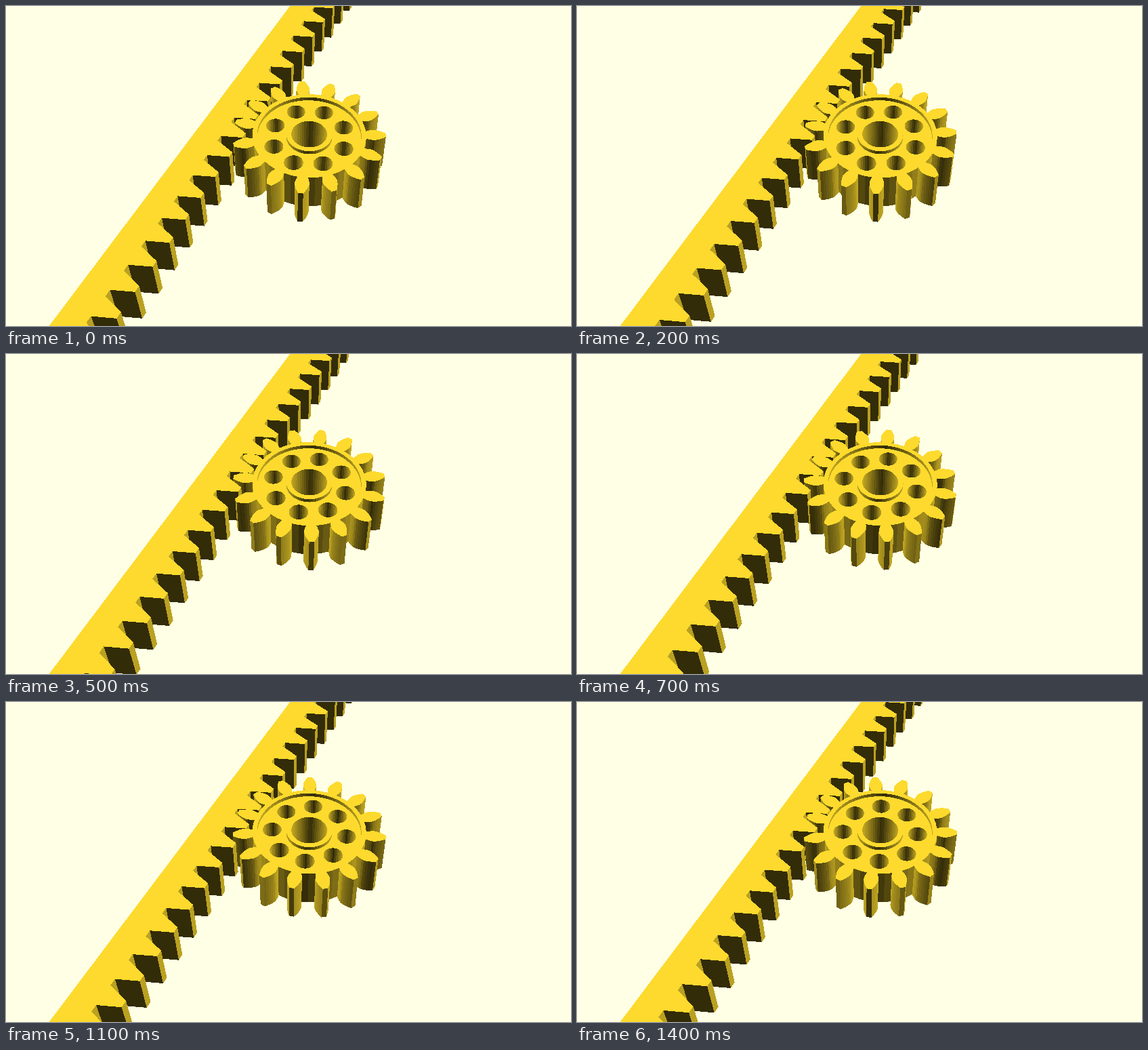
Animation of 834x472 px, one loop 1500 ms. Source, as an HTML page with a canvas:

```html
<!DOCTYPE html>
<html lang="en">
<head>
<meta charset="utf-8">
<title>Rack and pinion</title>
<style>
  html, body { margin: 0; width: 100%; height: 100%; overflow: hidden; background: #ffffe5; }
  canvas { display: block; }
</style>
</head>
<body>
<canvas id="stage" width="834" height="472"></canvas>
<script>
const W = 834, H = 472, STEPS = 15, STEP_MS = 100;
const ctx = document.getElementById('stage').getContext('2d');
const image = ctx.createImageData(W, H);
const pixels = new Uint32Array(image.data.buffer);
const nearness = new Float32Array(W * H);

const rad = deg => deg * Math.PI / 180;
const range = (n, fn) => Array.from({ length: n }, (_, i) => fn(i));

// Camera: 22.5 degree field of view, looking down at the scene
const FOCAL = H / 2 / Math.tan(rad(11.25));
const SIN = Math.sin(rad(49.3)), COS = Math.cos(rad(49.3));
const GOLD = [249, 215, 44];
const BACKGROUND = 0xffe5ffff;

// Gear and rack dimensions
const MODULE = 13.75, TEETH = 15, THICK = 67.5, RECESS = 6.6, BACKLASH = 0.7;
const PITCH = Math.PI * MODULE, PITCH_R = MODULE * TEETH / 2;
const ROOT_R = 87, TIP_R = PITCH_R + MODULE;
const BASE_R = PITCH_R * Math.cos(rad(20));
const GEAR = [31.7, 64.4];
const GEAR_PHASE = rad(-1.1), HOLE_PHASE = rad(20.1);
const RACK_SIN = Math.sin(rad(25.4)), RACK_COS = Math.cos(rad(25.4));
const RACK_START = 69.9, RACK_BACK = -158.6, RACK_ROOT = -118.9, RACK_TIP = -87.7;

const toCamera = ([x, y, z]) => [x, y * SIN + z * COS, FOCAL + y * COS - z * SIN];
const sub = (a, b) => a.map((v, i) => v - b[i]);
const dot = (a, b) => a[0] * b[0] + a[1] * b[1] + a[2] * b[2];
const cross = (a, b) => [
  a[1] * b[2] - a[2] * b[1],
  a[2] * b[0] - a[0] * b[2],
  a[0] * b[1] - a[1] * b[0]
];

function shade(normal) {
  const light = Math.abs(dot(normal, [-1, 1, -1])) / Math.sqrt(3) / Math.hypot(...normal);
  const [r, g, b] = GOLD.map(c => Math.min(255, Math.round(c * (0.2 + light))));
  return (255 << 24 | b << 16 | g << 8 | r) >>> 0;
}

// Fills a flat face (even-odd loops) with a depth test
function face(...loops) {
  const cam = loops.map(loop => loop.map(toCamera));
  const first = cam[0], n = first.length;
  const a = first[0], b = first[Math.floor(n / 3)], c = first[Math.floor(2 * n / 3)];
  const normal = cross(sub(b, a), sub(c, a));
  const offset = dot(normal, a);
  const color = shade(normal);

  const edges = [];
  let top = H, bottom = 0;
  for (const loop of cam) {
    const pts = loop.map(([x, y, z]) => [W / 2 + FOCAL * x / z, H / 2 - FOCAL * y / z]);
    pts.forEach((p, i) => {
      edges.push([p, pts[(i + 1) % pts.length]]);
      top = Math.min(top, p[1]);
      bottom = Math.max(bottom, p[1]);
    });
  }

  const lastRow = Math.min(H - 1, Math.ceil(bottom));
  for (let row = Math.max(0, Math.floor(top)); row <= lastRow; row++) {
    const y = row + 0.5, hits = [];
    for (const [p, q] of edges) {
      if ((p[1] <= y) !== (q[1] <= y)) {
        hits.push(p[0] + (q[0] - p[0]) * (y - p[1]) / (q[1] - p[1]));
      }
    }
    hits.sort((l, r) => l - r);
    const v = (H / 2 - y) / FOCAL;
    for (let i = 0; i + 1 < hits.length; i += 2) {
      const end = Math.min(W, Math.ceil(hits[i + 1] - 0.5));
      for (let col = Math.max(0, Math.ceil(hits[i] - 0.5)); col < end; col++) {
        const u = (col + 0.5 - W / 2) / FOCAL;
        const near = (normal[0] * u + normal[1] * v + normal[2]) / offset;
        const at = row * W + col;
        if (near > nearness[at]) {
          nearness[at] = near;
          pixels[at] = color;
        }
      }
    }
  }
}

const atHeight = (loop, z) => loop.map(([x, y]) => [x, y, z]);

function wall(loop, zTop, zBottom) {
  loop.forEach((p, i) => {
    const q = loop[(i + 1) % loop.length];
    face([[...p, zTop], [...q, zTop], [...q, zBottom], [...p, zBottom]]);
  });
}

const polar = (r, angle, [x, y] = GEAR) => [x + r * Math.cos(angle), y + r * Math.sin(angle)];
const circle = (r, count, turn = 0, center = GEAR) =>
  range(count, i => polar(r, turn + 2 * Math.PI * i / count, center));

const involute = cosine => Math.tan(Math.acos(cosine)) - Math.acos(cosine);

// Half the tooth thickness: involute outside, narrowing toward the root
function halfTooth(r) {
  const waist = 99, at = Math.max(r, waist);
  const angle = Math.PI / (2 * TEETH) + involute(Math.cos(rad(20))) - involute(BASE_R / at);
  const narrowing = 3.2 * (Math.max(0, waist - r) / (waist - ROOT_R)) ** 1.5;
  return at * angle - BACKLASH - narrowing;
}

function gearOutline(turn) {
  const radii = range(10, i => ROOT_R + (TIP_R - ROOT_R) * i / 9);
  return range(TEETH, k => {
    const mid = turn + 2 * Math.PI * k / TEETH;
    const side = sign => radii.map(r => polar(r, mid + sign * halfTooth(r) / r));
    return [...side(-1), ...side(1).reverse(), polar(ROOT_R, mid + Math.PI / TEETH)];
  }).flat();
}

function drawGear(turn) {
  const outline = gearOutline(GEAR_PHASE + turn);
  const rim = circle(79.7, 72, turn);
  const hub = circle(35.2, 48, turn);
  const bore = circle(27.4, 48, turn);
  const holes = range(8, i =>
    circle(14.5, 30, turn, polar(57.4, HOLE_PHASE + turn + i * Math.PI / 4)));

  face(atHeight(outline, 0), atHeight(rim, 0));
  face(atHeight(hub, 0), atHeight(bore, 0));
  face(...[rim, hub, ...holes].map(loop => atHeight(loop, -RECESS)));
  wall(outline, 0, -THICK);
  wall(rim, 0, -RECESS);
  wall(hub, 0, -RECESS);
  wall(bore, 0, -THICK);
  holes.forEach(hole => wall(hole, -RECESS, -THICK));
}

function drawRack(shift) {
  const place = (along, out) => [
    along * RACK_SIN + out * RACK_COS,
    along * RACK_COS - out * RACK_SIN
  ];
  const slope = Math.tan(rad(20));
  const tip = PITCH / 4 - MODULE * slope - BACKLASH;
  const root = PITCH / 4 + 1.25 * MODULE * slope - BACKLASH;
  const teeth = range(26, i => {
    const mid = RACK_START - shift + (i - 11) * PITCH;
    return [
      place(mid - root, RACK_ROOT), place(mid - tip, RACK_TIP),
      place(mid + tip, RACK_TIP), place(mid + root, RACK_ROOT)
    ];
  }).flat();
  const outline = [...teeth, place(700, RACK_BACK), place(-460, RACK_BACK)];
  face(atHeight(outline, 0));
  wall(outline, 0, -THICK);
}

let shown = -1;
function tick() {
  const step = Math.floor(performance.now() / STEP_MS) % STEPS;
  if (step !== shown) {
    shown = step;
    pixels.fill(BACKGROUND);
    nearness.fill(0);
    drawRack(PITCH * step / STEPS);
    drawGear(2 * Math.PI / TEETH * step / STEPS);
    ctx.putImageData(image, 0, 0);
  }
  requestAnimationFrame(tick);
}
tick();
</script>
</body>
</html>
```
